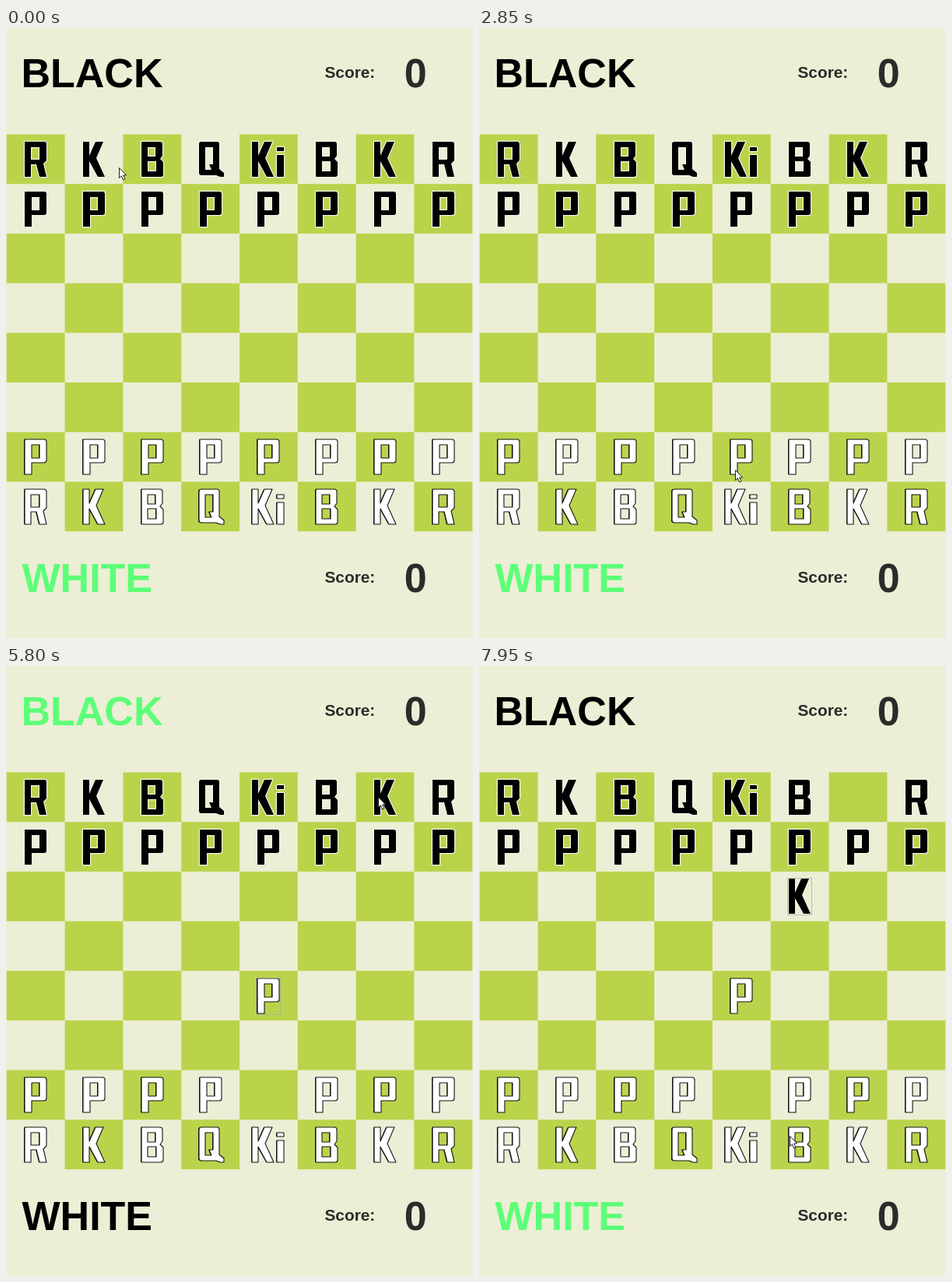
Animation, 600 px wide and 783 px high, one loop 8000 ms. Source, as an HTML page:

```html
<!DOCTYPE html>
<html lang="en">
<head>
<meta charset="utf-8">
<title>Chess</title>
<style>
  html, body { margin: 0; width: 100%; height: 100%; overflow: hidden; background: #eceed5; }
  svg { display: block; width: 600px; height: 783px; }
  text { font-family: "Liberation Sans", Arial, sans-serif; font-weight: bold; }
  .big { font-size: 52px; }
  .label { font-size: 20.8px; }
  .score { fill: #2b2b2b; }
  .piece path { fill-rule: evenodd; stroke-linejoin: round; }
  .focus { fill: none; stroke: #a9ada0; stroke-width: 1; shape-rendering: crispEdges; }
</style>
</head>
<body>
<svg id="stage" viewBox="0 0 600 783">
  <text id="black" class="big" x="19.5" y="76">BLACK</text>
  <text class="label score" x="409.5" y="64">Score:</text>
  <text class="big score" x="511.7" y="76">0</text>
  <text id="white" class="big" x="20.5" y="724">WHITE</text>
  <text class="label score" x="409.5" y="712">Score:</text>
  <text class="big score" x="511.7" y="724">0</text>
</svg>
<script>
const LOOP = 8000, X0 = 0.8, Y0 = 136.5, W = 74.8, H = 63.7;
const GREEN = '#b9d44a', ACTIVE = '#5dff78';
const RED = '#f57573', BLUE = '#b7cde2', YELLOW = '#fafd9d';

// Letter outlines in a 32 x 47 box
const K = 'M2 1H10V19L18 1H28L19 22L30 46H21L10 26V46H2Z';
const GLYPHS = {
  P: 'M2 1H27Q30 1 30 4V28Q30 31 27 31H11V46H2Z M11 8V25H21V8Z',
  R: 'M2 1H27Q30 1 30 4V25L26 29L30 46H21L17 30H10V46H2Z M10 8V24H21V8Z',
  B: 'M2 1H26Q29 1 29 4V19L26 23L30 27V43Q30 46 27 46H2Z M10 8V20H20V8Z M10 26V39H21V26Z',
  Q: 'M1 4Q1 1 4 1H24Q27 1 27 4V36L33 41V46H28L23 44H4Q1 44 1 41Z M9 8V37H17L14 30H19V8Z',
  K,
  Ki: K + ' M34 8H43V13H34Z M34 18H43V46H34Z'
};
const BACK_ROW = ['R', 'K', 'B', 'Q', 'Ki', 'B', 'K', 'R'];

const stage = document.getElementById('stage');

function add(parent, tag, attrs) {
  const el = document.createElementNS('http://www.w3.org/2000/svg', tag);
  for (const name in attrs) el.setAttribute(name, attrs[name]);
  return parent.appendChild(el);
}

const cells = [];
for (let row = 0; row < 8; row++) {
  for (let col = 0; col < 8; col++) {
    cells.push(add(stage, 'rect', { x: X0 + col * W, y: Y0 + row * H, width: W, height: H }));
  }
}

function place(el, col, row, width = 32) {
  const x = X0 + col * W + (W - width) / 2, y = Y0 + row * H + 8.4;
  el.setAttribute('transform', `translate(${Math.round(x)} ${Math.round(y)})`);
}

function addPiece(name, col, row, isWhite) {
  const group = add(stage, 'g', { class: 'piece' });
  const d = GLYPHS[name];
  if (isWhite) {
    add(group, 'path', { d, fill: '#111', transform: 'translate(-1 0)' });
    add(group, 'path', { d, fill: '#fff', stroke: '#151515', 'stroke-width': 1.1 });
  } else {
    add(group, 'path', { d, fill: '#f2f3e6', stroke: '#f2f3e6', 'stroke-width': 2.4 });
    add(group, 'path', { d, fill: '#000' });
  }
  place(group, col, row, name === 'Ki' ? 46 : 32);
  return group;
}

const pieces = {};
for (let col = 0; col < 8; col++) {
  pieces['b0' + col] = addPiece(BACK_ROW[col], col, 0, false);
  pieces['b1' + col] = addPiece('P', col, 1, false);
  pieces['w6' + col] = addPiece('P', col, 6, true);
  pieces['w7' + col] = addPiece(BACK_ROW[col], col, 7, true);
}

const focusBox = add(stage, 'rect', { class: 'focus', x: 0.5, y: 0.5, width: 31, height: 47 });
const cursor = add(stage, 'path', {
  d: 'M.5 .5V13.5L3.4 10.8L5.6 16L7.9 15L5.7 10H9.6Z',
  fill: '#fff', stroke: '#222', 'stroke-width': 1
});

// Squares are [col, row]
const MOVES = [
  { piece: pieces.w64, from: [4, 6], to: [4, 4], targets: [[4, 5], [4, 4]], pick: 3200, drop: 4350 },
  { piece: pieces.b06, from: [6, 0], to: [5, 2], targets: [[5, 2], [7, 2]], pick: 6300, drop: 7400 }
];

// Cursor stops: time, x, y
const STOPS = [
  [0, 145, 179], [150, 145, 179], [1500, 401, 423], [1600, 401, 423],
  [2800, 329, 567], [3300, 329, 567], [4150, 348, 431], [4550, 348, 431],
  [5750, 478, 168], [6350, 478, 168], [7050, 407, 294], [7450, 407, 294],
  [7950, 399, 603], [LOOP, 399, 603]
];

function cursorAt(t) {
  const i = STOPS.findIndex(stop => stop[0] > t);
  const [t0, x0, y0] = STOPS[i - 1], [t1, x1, y1] = STOPS[i];
  const p = (t - t0) / (t1 - t0), ease = p * p * (3 - 2 * p);
  return [x0 + (x1 - x0) * ease, y0 + (y1 - y0) * ease];
}

function render(t) {
  const [x, y] = cursorAt(t);
  const hovered = Math.floor((y - Y0) / H) * 8 + Math.floor((x - X0) / W);
  cursor.setAttribute('transform', `translate(${Math.round(x)} ${Math.round(y)})`);

  cells.forEach((cell, i) => {
    cell.setAttribute('fill', ((i >> 3) + i) % 2 ? 'none' : GREEN);
  });

  let focus = [0, 0];
  for (const { piece, from, to, targets, pick, drop } of MOVES) {
    const dropped = t >= drop;
    place(piece, ...(dropped ? to : from));
    if (dropped) focus = to;
    if (t < pick || dropped) continue;
    cells[from[1] * 8 + from[0]].setAttribute('fill', RED);
    for (const [col, row] of targets) {
      const index = row * 8 + col;
      cells[index].setAttribute('fill', index === hovered ? BLUE : YELLOW);
    }
  }
  place(focusBox, ...focus);
  const picked = MOVES.some(move => t >= move.pick && t < move.drop);
  focusBox.setAttribute('opacity', picked ? 0 : t < MOVES[0].drop ? 0.35 : 0.75);

  const blackTurn = t >= MOVES[0].drop && t < MOVES[1].drop;
  document.getElementById('black').setAttribute('fill', blackTurn ? ACTIVE : '#000');
  document.getElementById('white').setAttribute('fill', blackTurn ? '#000' : ACTIVE);
}

const start = performance.now();
function tick() {
  render((performance.now() - start) % LOOP);
  requestAnimationFrame(tick);
}
tick();
</script>
</body>
</html>
```
